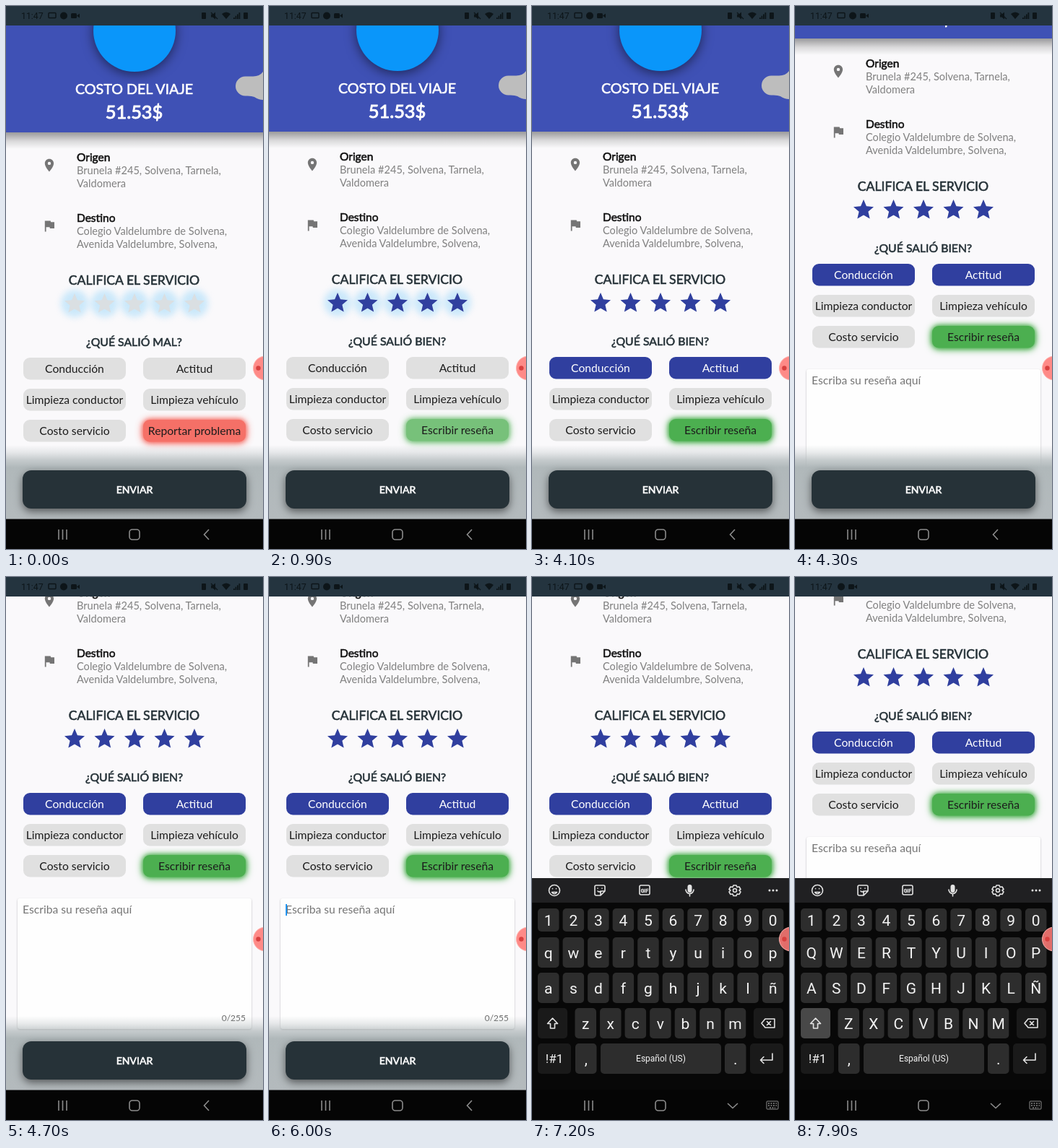
Animation, 356 px wide and 752 px high, one loop 8000 ms. Source, as an HTML page:

```html
<!DOCTYPE html>
<html lang="es">
<head>
<meta charset="utf-8">
<style>
  html, body { margin: 0; width: 356px; height: 752px; overflow: hidden; background: #faf9fb; }
  svg { display: block; font-family: Lato, sans-serif; }
  .mid { text-anchor: middle; }
  .heavy { stroke: currentColor; stroke-width: .6px; }
  .price { stroke-width: 1px; }
  .line { fill: none; stroke: #e4e4e4; stroke-width: 1.6; stroke-linecap: round; stroke-linejoin: round; }
  .nav { fill: none; stroke: #8c8c8c; stroke-width: 1.6; }
  .kb { font-family: Roboto, sans-serif; }
  .caps .letter { text-transform: uppercase; }
  .caps #shift { fill: #484848; }
</style>
</head>
<body>
<svg id="stage" width="356" height="752" viewBox="0 0 356 752"></svg>
<script>
const DURATION = 8000;
const INK = '#263238', INDIGO = '#303f9f', GREY = '#808080';
const STAR = 'M12 17.27L18.18 21l-1.64-7.03L22 9.24l-7.19-.61L12 2 9.19 8.63 2 9.24l5.46 4.73L5.82 21z';

const text = (x, y, str, size, fill, cls = '', extra = '') =>
  `<text x="${x}" y="${y}" font-size="${size}" fill="${fill}" color="${fill}" class="${cls}" ${extra}>${str}</text>`;
const rect = (x, y, w, h, r, fill, extra = '') =>
  `<rect x="${x}" y="${y}" width="${w}" height="${h}" rx="${r}" fill="${fill}" ${extra}/>`;
const path = (d, extra = '') => `<path d="${d}" ${extra}/>`;
const circle = (x, y, r, fill, extra = '') => `<circle cx="${x}" cy="${y}" r="${r}" fill="${fill}" ${extra}/>`;
const group = (id, content, extra = '') => `<g id="${id}" ${extra}>${content}</g>`;
const fade = (id, ...stops) => `<linearGradient id="${id}" x2="0" y2="1">` + stops.map(([at, color, alpha]) =>
  `<stop offset="${at}" stop-color="${color}" stop-opacity="${alpha}"/>`).join('') + '</linearGradient>';

const starXs = [0, 1, 2, 3, 4].map(i => 95 + i * 41.5);
const stars = fill => starXs.map(x =>
  path(STAR, `fill="${fill}" transform="translate(${x - 16.8} 394.2) scale(1.4)"`)).join('');

const chip = (id, col, row, label) => {
  const x = 24 + col * 166, y = 486 + row * 43;
  return group(id, rect(x, y, 142, 30.5, 9, '#e0e0e0') +
    text(x + 71, y + 20.5, label, 15.7, '#1c1c1c', 'mid'));
};

const header =
  rect(0, 170, 356, 27, 0, 'url(#headShade)') +
  rect(0, -60, 356, 234, 0, '#3f51b5') +
  circle(178, 33, 57, '#0a96fa', 'style="filter:drop-shadow(0 3px 8px #0008)"') +
  path('M356 90Q351 97 341 96.500L331.500 96.500A13.500 13.500 0 0 0 331.500 123.500Q340 123 344 125Q350 129 356 129Z', 'fill="#bdbdbd"') +
  text(177.5, 120.5, 'COSTO DEL VIAJE', 19.7, '#fff', 'mid heavy') +
  text(177.5, 155, '51.53$', 25.4, '#fff', 'mid heavy price');

const trip =
  path('M12 2C8.130 2 5 5.130 5 9c0 5.250 7 13 7 13s7-7.750 7-13c0-3.870-3.130-7-7-7zm0 9.500a2.500 2.500 0 0 1 0-5 2.500 2.500 0 0 1 0 5z',
    'fill="#757575" transform="translate(49.4 209) scale(.88)"') +
  path('M14.400 6L14 4H5v17h2v-7h5.600l.4 2h7V6z', 'fill="#757575" transform="translate(49.4 293) scale(.88)"') +
  text(98, 214, 'Origen', 15.5, '#111', 'heavy') +
  text(98, 232, 'Brunela #245, Solvena, Tarnela,', 14.6, GREY) +
  text(98, 250, 'Valdomera', 14.6, GREY) +
  text(98, 297.5, 'Destino', 15.5, '#111', 'heavy') +
  text(98, 315.5, 'Colegio Valdelumbre de Solvena,', 14.6, GREY) +
  text(98, 333.5, 'Avenida Valdelumbre, Solvena,', 14.6, GREY);

const rating =
  text(177.5, 385, 'CALIFICA EL SERVICIO', 17.6, INK, 'mid heavy') +
  group('glow', starXs.map(x => circle(x, 411, 19, '#cbe8fa')).join(''), 'style="filter:blur(4px)"') +
  stars('#dadfe2') + group('rated', stars(INDIGO), 'clip-path="url(#ratedClip)"') +
  text(177.5, 469.5, '', 15.8, INK, 'mid heavy', 'id="question"') +
  chip('driving', 0, 0, 'Conducción') + chip('attitude', 1, 0, 'Actitud') +
  chip('', 0, 1, 'Limpieza conductor') + chip('', 1, 1, 'Limpieza vehículo') +
  chip('', 0, 2, 'Costo servicio') +
  rect(190, 572, 142, 30.5, 9, '', 'id="action"') +
  text(261, 592.5, '', 15.7, '#1c1c1c', 'mid', 'id="actionLabel"');

const review = group('review',
  rect(16, 632, 324, 181, 3, '#fefefe', 'style="filter:drop-shadow(0 1px 1px #0004)"') +
  text(23, 653, 'Escriba su reseña aquí', 15.7, '#757575') +
  text(332, 802, '0/255', 12, '#666', '', 'text-anchor="end"') +
  rect(23, 640, 2, 16, 0, '#2196f3', 'id="caret"'));

const footer =
  rect(0, 608, 356, 104, 0, 'url(#footShade)') +
  rect(23, 643, 310, 53, 12, INK, 'style="filter:drop-shadow(0 4px 6px #0008)"') +
  text(178, 674.5, 'ENVIAR', 14, '#fff', 'mid heavy');

const key = (x, y, w, h, label = '', cls = '', fill = '#2d2d2d', size = 21) =>
  rect(x, y, w, h, 5, fill) + text(x + w / 2, y + h / 2 + size * .36, label, size, '#f4f4f4', 'mid ' + cls);
const keyRow = (chars, x, y, h) => [...chars].map((c, i) => key(x + i * 34.55, y, 29.5, h, c, 'letter')).join('');
const DARK_KEY = '#1a1a1a';

const toolbar = rect(0, 417, 356, 34, 0, '#202022') +
  `<g class="line">` +
  circle(31, 434, 7.5, 'none') + path('M27.500 436.500Q31 441 34.500 436.500Z M28.500 431.500v.3 M33.500 431.500v.3') +
  path('M89 427h10a2 2 0 0 1 2 2v6l-6 6h-6a2 2 0 0 1-2-2v-10a2 2 0 0 1 2-2Z M95 441v-4q0-2 2-2h4 M91 431v.3 M97 431v.3 M91 435q2 2 4 0') +
  rect(149, 427, 14, 13, 2, 'none') +
  path('M213 433a5.500 5.500 0 0 0 11 0 M218.500 439v3') +
  circle(281, 434, 2.5, 'none') +
  path('M279 427h4l1 2.500 3-.5 2 3.500-2 1.500 2 2-2 3.500-3-.5-1 2.500h-4l-1-2.500-3 .5-2-3.500 2-2-2-1.500 2-3.500 3 .5Z') +
  '</g>' + text(156, 436.6, 'GIF', 7, '#e4e4e4', 'mid heavy') +
  rect(215.5, 426, 6, 11, 3, '#e4e4e4') +
  [329, 334, 339].map(x => circle(x, 434, 1.5, '#e4e4e4')).join('');

const keyboard = group('keyboard',
  rect(0, 417, 356, 335, 0, '#080808') + toolbar +
  keyRow('1234567890', 8, 459, 32) + keyRow('qwertyuiop', 8, 499, 42) +
  keyRow('asdfghjklñ', 8, 548, 42) + keyRow('zxcvbnm', 59.5, 597, 42) +
  rect(8, 597, 41, 42, 5, DARK_KEY, 'id="shift"') + key(307, 597, 41, 42, '', '', DARK_KEY) +
  key(8, 646, 46, 42, '!#1', '', DARK_KEY, 17) + key(60, 646, 29.5, 42, ',') +
  key(95, 646, 167, 42, 'Español (US)', '', '#2d2d2d', 12) +
  key(267, 646, 29.5, 42, '.') + key(302, 646, 46, 42, '', '', DARK_KEY) +
  `<g class="line">` +
  path('M28.500 611l7 7.500h-4v6.500h-6v-6.500h-4Z') +
  path('M323 612h13v12h-13l-5-6Z M325.500 615.500l5 5 M330.500 615.500l-5 5') +
  path('M333 660v9h-16 M321 664.500l-4.500 4.500 4.500 4.500') + '</g>', 'class="kb"');

const navBar = rect(0, 710.5, 356, 42, 0, '#050505') + `<g class="nav">` +
  path('M73 725v14 M78.500 725v14 M84 725v14') + rect(171, 725, 14, 14, 4, 'none') +
  path('M281 725l-6.500 7 6.500 7', 'id="back"') +
  group('dismiss', path('M271 729l7 6.500 7-6.500') + rect(325, 726, 16, 11, 1, 'none', 'stroke-width="1"') +
    path('M327 729h12 M327 732h12 M329 735h8', 'stroke-dasharray="2 1.500"')) + '</g>';

const statusInk = '#0d1519';
const statusBar = rect(0, 0, 356, 27, 0, '#24343f') +
  text(21, 18, '11:47', 12.3, statusInk, '', 'style="font-family:Roboto,sans-serif"') +
  rect(59, 9.5, 10, 7, 1, 'none', `id="cast" stroke="${statusInk}" stroke-width="1.4"`) +
  group('notices', circle(80, 13.5, 5, statusInk) + rect(90, 10, 8, 7, 1.5, statusInk) +
    path('M98 13.500l4-3v6Z', `fill="${statusInk}"`)) +
  `<g fill="${statusInk}">` + rect(271, 9, 6, 9, 1, statusInk) +
  path('M284 11.500h2.500l3.500-3v10l-3.500-3h-2.500Z M299 11q6-5 12 0l-6 7Z') +
  [0, 1, 2, 3].map(i => rect(315 + i * 2.5, 16 - i * 2.3, 1.8, 2 + i * 2.3, 0, statusInk)).join('') +
  rect(329, 9, 6, 9, 1, statusInk) + path('M284 9l9 9', `stroke="${statusInk}" stroke-width="1.3"`) + '</g>';

const touchDot = circle(359, 501.5, 16.5, '#ff7b78', 'fill-opacity=".88" stroke="#ffb4b0" stroke-width="1"') +
  circle(349.5, 501.5, 3.2, '#d8403f');

const $ = id => document.getElementById(id);
$('stage').innerHTML = '<defs>' +
  fade('headShade', [0, '#000', .46], [.3, '#000', .3], [.6, '#000', .13], [1, '#000', 0]) +
  fade('footShade', [0, '#b0b8ba', 0], [.1, '#b0b8ba', .28], [.2, '#b0b8ba', .72], [.3, '#b0b8ba', 1], [1, '#b4babd', 1]) +
  '<clipPath id="ratedClip"><rect id="ratedArea" x="74.25" y="390" height="45"/></clipPath></defs>' +
  rect(0, 0, 356, 752, 0, '#faf9fb') + group('page', header + trip + rating + review) +
  footer + keyboard + navBar + statusBar + touchDot;

const ramp = (t, from, to) => Math.min(1, Math.max(0, (t - from) / (to - from)));
const easeOut = p => 1 - (1 - p) ** 2;
const show = (id, on) => $(id).style.display = on ? '' : 'none';

function select(id, on) {
  const [box, label] = $(id).children;
  box.setAttribute('fill', on ? INDIGO : '#e0e0e0');
  label.setAttribute('fill', on ? '#fff' : '#1c1c1c');
}

function draw(t) {
  const scroll = -1 + ramp(t, 800, 1000) + 187 * easeOut(ramp(t, 4144, 4500)) +
    85 * easeOut(ramp(t, 7750, 7900));
  $('page').setAttribute('transform', `translate(0 ${-Math.round(scroll)})`);

  const score = t < 100 ? 0 : t < 200 ? 1.5 : t < 400 ? 2.5 : t < 600 ? 3.5 : 5;
  const good = score === 5;
  $('ratedArea').setAttribute('width', score * 41.5);
  $('glow').style.opacity = 1 - ramp(t, 1300, 1700);
  $('question').textContent = good ? '¿QUÉ SALIÓ BIEN?' : '¿QUÉ SALIÓ MAL?';
  $('actionLabel').textContent = good ? 'Escribir reseña' : 'Reportar problema';

  const color = good ? '#4caf50' : '#f44336';
  $('action').setAttribute('fill', color);
  $('action').style.filter = `drop-shadow(0 0 3px ${color}) drop-shadow(0 1px 5px ${color})`;
  $('action').style.opacity = t < 4100 ? .75 : 1;
  select('driving', t >= 2500);
  select('attitude', t >= 3200);

  show('review', t >= 4144);
  show('caret', t >= 5200 && t < 5500 || t >= 5900 && t < 6700);

  const slide = easeOut(ramp(t, 6660, 6800));
  show('keyboard', slide > 0);
  $('keyboard').setAttribute('transform', `translate(0 ${335 * (1 - slide)})`);
  show('back', slide === 0);
  show('dismiss', slide > 0);

  const caps = t >= 7800;
  $('keyboard').classList.toggle('caps', caps);
  show('cast', !caps);
  $('notices').setAttribute('transform', `translate(${caps ? -16 : 0} 0)`);
}

const start = performance.now();
function tick() {
  draw((performance.now() - start) % DURATION);
  requestAnimationFrame(tick);
}
tick();
</script>
</body>
</html>
```
